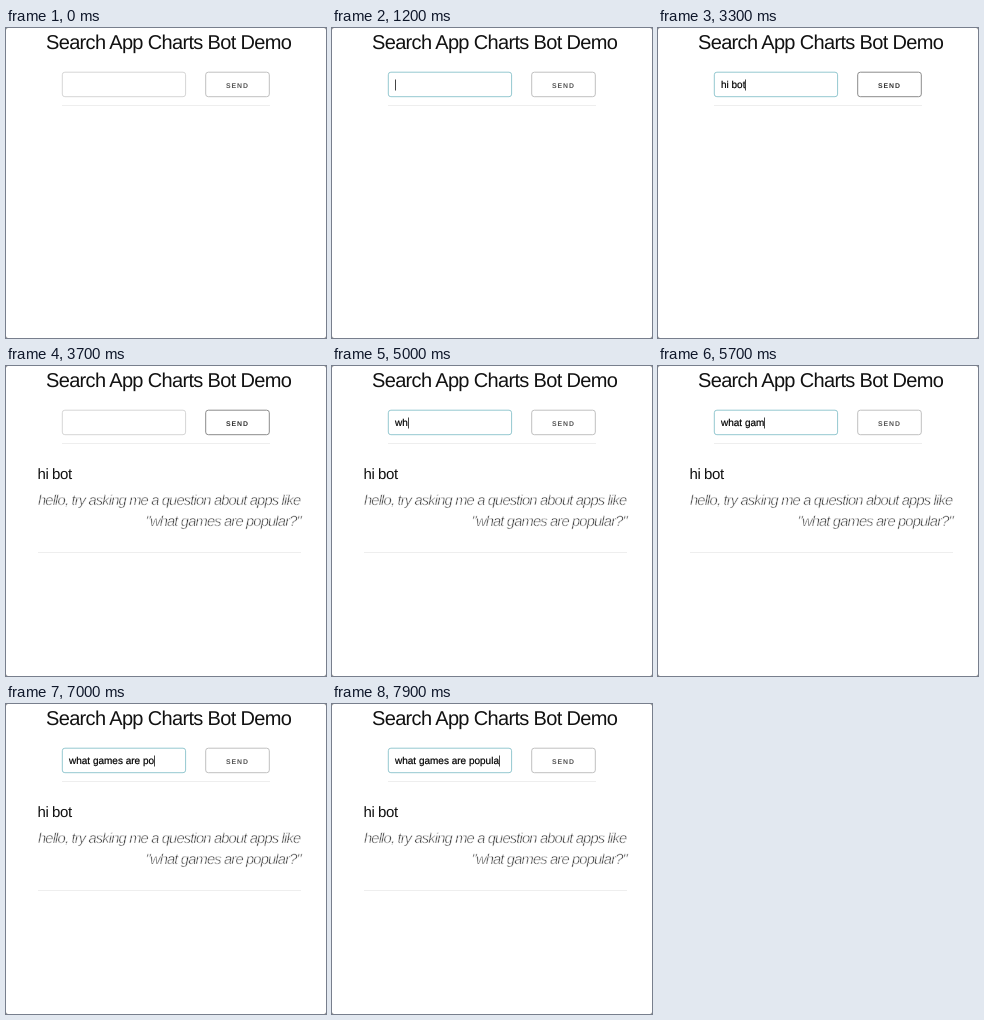
An HTML page with a canvas that plays this animation: 320 px wide and 310 px high, repeating every 8000 ms.

```html
<!DOCTYPE html>
<html lang="en">
<head>
<meta charset="utf-8">
<title>Bot Demo</title>
<style>
html, body { margin: 0; width: 100%; height: 100%; overflow: hidden; background: #fff; }
canvas { display: block; }
</style>
</head>
<body>
<canvas id="stage" width="320" height="310"></canvas>
<script>
const ctx = document.getElementById('stage').getContext('2d');
const LOOP = 8000;
const SANS = '"Liberation Sans", Arial, sans-serif';
const SENT_AT = 3700;

// Each typing run: the message, when its field is cleared, and the key times.
const RUNS = [
  { text: 'hi bot', from: 0, to: SENT_AT,
    keys: [1600, 1700, 1900, 2000, 2100, 2300] },
  { text: 'what games are popula', from: SENT_AT, to: LOOP,
    keys: [4900, 5000, 5100, 5200, 5300,
           5500, 5600, 5700, 5800, 5900, 6000, 6100,
           6400, 6500, 6700, 6800, 7000, 7500, 7700, 7800, 7900] }
];
const FOCUS = [[1200, 3400], [4300, LOOP]];
const CARET_HIDDEN = [[2800, 3300], [4800, 4900]];
const HOVER = [[2600, 4300]];

const during = (spans, t) => spans.some(([a, b]) => t >= a && t < b);

// A positive weight thickens the letters, a negative one shaves their outline.
function text(str, x, y, font, { color = '#111', spacing = 0, weight = 0 } = {}) {
  ctx.font = `${font} ${SANS}`;
  ctx.letterSpacing = `${spacing}px`;
  ctx.textRendering = 'geometricPrecision';
  ctx.fillStyle = color;
  ctx.fillText(str, x, y);
  if (weight) {
    ctx.strokeStyle = weight > 0 ? color : '#fff';
    ctx.lineWidth = Math.abs(weight);
    ctx.lineJoin = 'round';
    ctx.strokeText(str, x, y);
  }
}

function box(x, y, w, h, color) {
  ctx.beginPath();
  ctx.roundRect(x, y, w, h, 2.6);
  ctx.strokeStyle = color;
  ctx.lineWidth = 1;
  ctx.stroke();
}

function rule(x1, x2, y) {
  ctx.fillStyle = '#eee';
  ctx.fillRect(x1, y, x2 - x1, 1);
}

function drawWindow() {
  ctx.fillStyle = '#777';
  ctx.fillRect(0, 0, 320, 310);
  ctx.fillStyle = '#fff';
  ctx.beginPath();
  ctx.roundRect(0, 0, 320, 310, 2);
  ctx.fill();
}

function drawField(t) {
  const focused = during(FOCUS, t);
  box(56.3, 44.2, 123.3, 24.5, focused ? '#94c8d0' : '#d6d6d6');
  const run = RUNS.find(r => t >= r.from && t < r.to);
  const typed = run.text.slice(0, run.keys.filter(k => t >= k).length);
  text(typed, 63, 60.2, '10px', { color: '#000', weight: 0.2 });
  if (focused && !during(CARET_HIDDEN, t)) {
    const x = Math.round(63 + ctx.measureText(typed).width);
    ctx.fillStyle = '#444';
    ctx.fillRect(x, 51.5, 1, 11);
  }
}

function drawButton(hover) {
  box(199.7, 44.2, 63.6, 24.5, hover ? '#8c8c8c' : '#c0c0c0');
  text('SEND', 220, 59.5, 'bold 6.9px', { color: hover ? '#333' : '#555', spacing: 0.95 });
}

function drawChat() {
  text('hi bot', 31.5, 112.7, '15px', { spacing: -0.42 });
  const reply = { color: '#222', spacing: -0.83, weight: -0.55 };
  text('hello, try asking me a question about apps like', 32, 138.6, 'italic 14.7px', reply);
  text('"what games are popular?"', 139.5, 160.3, 'italic 14.7px', reply);
  rule(32, 295, 186);
}

function draw() {
  const t = performance.now() % LOOP;
  drawWindow();
  text('Search App Charts Bot Demo', 40, 21, '20px', { spacing: -0.66 });
  drawField(t);
  drawButton(during(HOVER, t));
  rule(56, 264, 77);
  if (t >= SENT_AT) drawChat();
  requestAnimationFrame(draw);
}
draw();
</script>
</body>
</html>
```
